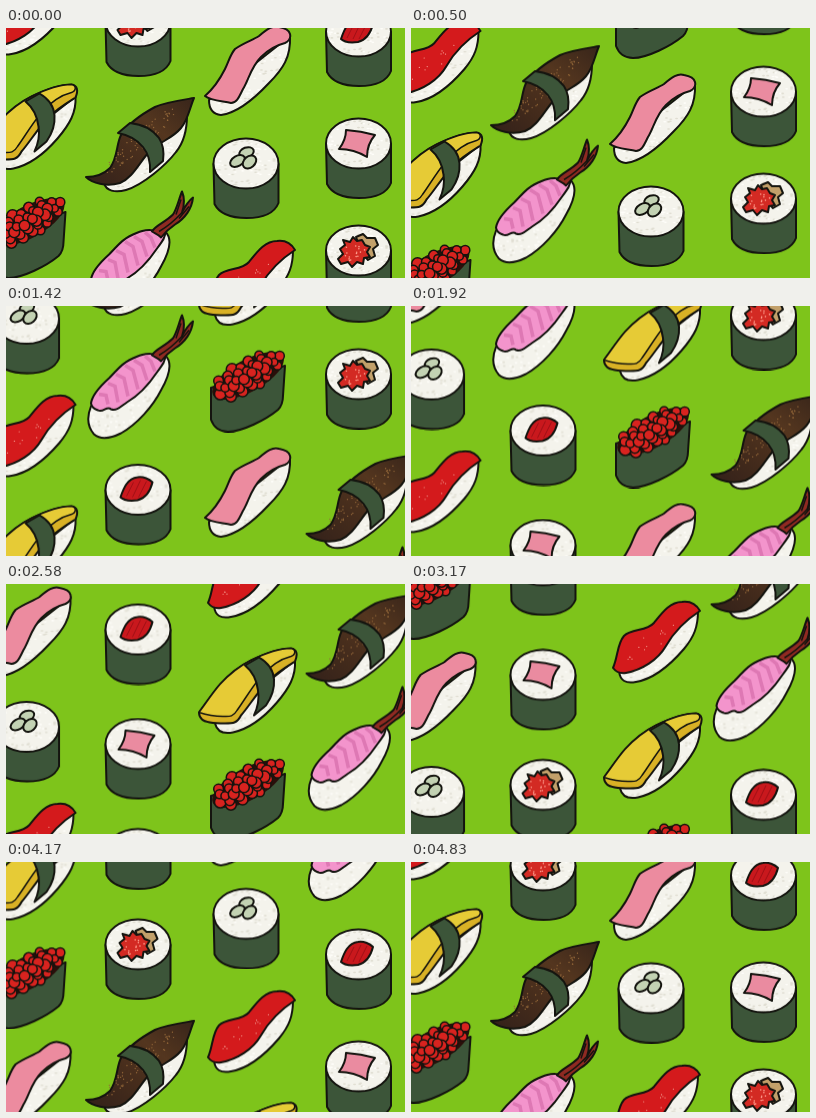
An HTML page for the animation above (4.91 s loop, 399x250 px).

```html
<!DOCTYPE html>
<html lang="en">
<head>
<meta charset="utf-8">
<title>Sushi columns</title>
<style>
  html, body { margin: 0; width: 100%; height: 100%; overflow: hidden; background: #7ec41b; }
  svg { display: block; width: 100%; height: 100%; }
  .up, .down { animation: up 4910ms -4ms infinite; }
  .down { animation-name: down; }
  /* 59 steps per loop, the first 11 a little slower */
  @keyframes up {
    0% { transform: translateY(0); animation-timing-function: steps(11); }
    18.644% { transform: translateY(-95px); animation-timing-function: steps(48); }
    100% { transform: translateY(-569px); }
  }
  @keyframes down {
    0% { transform: translateY(0); animation-timing-function: steps(11); }
    18.644% { transform: translateY(88px); animation-timing-function: steps(48); }
    100% { transform: translateY(534px); }
  }
  .ink { stroke: #14140f; stroke-width: 2; stroke-linejoin: round; stroke-linecap: round; }
  .thin { stroke: #14140f; stroke-width: 1.5; stroke-linejoin: round; }
  .line { fill: none; }
  .rice { fill: url(#grains); }
  .nori { fill: #3c5539; }
</style>
</head>
<body>
<svg viewBox="0 0 399 250" preserveAspectRatio="none">
  <defs>
    <pattern id="grains" width="40" height="40" patternUnits="userSpaceOnUse">
      <rect width="40" height="40" fill="#f4f3ec"/>
    </pattern>
    <linearGradient id="brown" x1="0" y1="1" x2="1" y2="0">
      <stop offset="0" stop-color="#33211a"/>
      <stop offset=".35" stop-color="#452c1c"/>
      <stop offset=".65" stop-color="#54361f"/>
      <stop offset="1" stop-color="#38251a"/>
    </linearGradient>

    <g id="roll">
      <path class="nori ink" d="M0 26 L1 66 C6 76 18 80 33 80 C49 80 61 75 65 65 L65 26Z"/>
      <ellipse class="rice ink" cx="32.5" cy="25.5" rx="32.5" ry="25"/>
    </g>
    <g id="tunaRoll">
      <use href="#roll"/>
      <path class="ink" fill="#c9181d" d="M15 33 C18 24 22 14 32 13 C38 12 44 15 47 18 C45 26 40 34 32 36 C24 37 18 36 15 33Z"/>
      <path class="line" stroke="#a01016" d="M21 32 L28 18 M27 33 L35 16 M33 33 L41 17"/>
    </g>
    <g id="pinkRoll">
      <use href="#roll"/>
      <path class="ink" fill="#ea8ba0" d="M20 12 Q35 13 49 17 Q41 26 41 39 Q28 31 13 31 Q20 22 20 12Z"/>
    </g>
    <g id="roeRoll">
      <use href="#roll"/>
      <path class="ink" fill="#c2a06a" d="M30 12 L37 9 L41 13 L49 13 L52 20 L47 24 L49 31 L42 35 L36 28Z"/>
      <path class="ink" fill="#d32a23" d="M12 34 L17 29 L14 24 L19 20 L17 15 L24 17 L27 12 L31 16 L36 15 L39 20 L44 22 L41 27 L44 32 L38 33 L37 39 L31 37 L26 42 L22 37 L15 39Z"/>
      <g id="roeDots" fill="#ff9c8c"></g>
    </g>
    <g id="cucumberRoll">
      <use href="#roll"/>
      <g class="ink" fill="#c3d2b3">
        <ellipse cx="33" cy="14.5" rx="7.5" ry="5" transform="rotate(-20 33 14.5)"/>
        <ellipse cx="24" cy="23" rx="8" ry="5" transform="rotate(-30 24 23)"/>
        <ellipse cx="36" cy="24" rx="7.5" ry="5.5" transform="rotate(-40 36 24)"/>
      </g>
    </g>

    <g id="salmon">
      <path class="rice ink" d="M6 73 C6 80 8 87 18 88 C34 86 52 71 66 56 C80 42 88 30 87 9Z"/>
      <path class="ink" fill="#ec8b9f" d="M2 69 C10 62 18 50 22 42 C26 34 27 28 32 22 C40 16 50 13 56 9 C64 2 70 -2 76 0 C82 1 86 3 87 7 C88 11 86 14 82 16 C74 18 66 22 58 30 C48 40 46 52 40 62 C36 70 34 76 28 76 C20 74 8 74 2 69Z"/>
    </g>
    <g id="tuna">
      <path class="rice ink" d="M7 70 C8 80 14 83 24 81 C42 78 60 62 72 48 C82 36 86 26 86 10Z"/>
      <path class="ink" fill="#d41a1c" d="M1 67 C6 56 5 43 12 35 C20 27 34 31 42 22 C50 12 58 1 70 1 C78 0 84 3 88 10 C74 19 62 31 54 45 C46 59 30 69 14 72 C8 73 4 71 1 67Z"/>
      <g id="tunaDots" fill="#f7a79a"></g>
    </g>
    <g id="omelette">
      <path class="rice ink" d="M16 77 C18 85 24 88 34 86 C52 82 66 70 78 56 C90 42 97 30 96 14Z"/>
      <path class="ink" fill="#d9b125" d="M0 66 C6 58 14 46 21 38 C30 28 40 20 52 14 C66 7 80 2 92 2 C98 3 99 8 96 15 C88 20 78 26 70 34 C58 46 50 60 42 69 C38 77 34 77 26 77 C16 77 6 76 3 73 C0 70 0 68 0 66Z"/>
      <path class="thin" fill="#e6cb36" d="M0 66 C6 58 14 46 21 38 C30 28 40 20 52 14 C66 7 80 2 92 2 C97 3 97 8 92 10 C80 13 70 21 62 30 C52 42 44 56 38 64 C34 71 30 70 24 70 C14 70 6 68 0 66Z"/>
      <path class="nori ink" d="M46 19 L60 11 Q74 19 75 33 Q76 46 67 59 L55 69 Q61 56 59 44 Q57 28 46 19Z"/>
    </g>
    <g id="gunkan">
      <path class="nori ink" d="M1 42 L1 74 C4 82 10 86 18 86 C32 86 56 74 68 64 C72 60 73 56 73 50 L75 20Z"/>
      <ellipse cx="38" cy="30" rx="40" ry="16" transform="rotate(-29 38 30)" fill="#2a0f0a"/>
      <g id="roe" class="thin"></g>
    </g>
    <g id="eel">
      <path class="rice ink" d="M18 86 C20 94 29 96 40 93 C57 88 80 68 90 55 C99 44 101 32 101 18Z"/>
      <path class="ink" fill="url(#brown)" d="M108 1 C96 3 80 5 69 10 C56 17 42 27 35 38 C30 48 32 60 24 71 C17 78 8 80 0 80 C6 86 20 90 34 86 C46 81 52 68 62 56 C74 44 86 42 95 31 C102 23 104 10 108 1Z"/>
      <g id="eelMarks" fill="#94683a"></g>
      <path class="nori ink" d="M32 36 L44 26 Q63 28 73 41 Q79 50 77 64 L64 75 Q65 60 57 50 Q48 39 32 36Z"/>
    </g>
    <g id="shrimp">
      <path class="rice ink" d="M4 92 C0 102 0 112 7 120 C14 126 24 124 34 119 C50 110 66 92 74 76 C82 62 86 48 78 41Z"/>
      <path class="ink" fill="#f394cc" d="M70 41 C60 37 50 42 42 46 C34 50 30 56 22 64 C12 73 5 82 4 89 C5 95 9 95 11 96 C16 99 20 91 24 95 C30 97 34 92 40 88 C52 81 62 70 70 58 C76 50 79 46 78 40Z"/>
      <path class="line" stroke="#de78b4" stroke-width="3.5" d="M12 80 L19 81 L21 90 M21 69 L28 72 L31 88 M29 60 L37 64 L41 82 M38 51 L46 56 L51 75 M47 46 L55 51 L60 66 M58 42 L64 47 L68 57"/>
      <path class="ink" fill="#8f2a22" d="M65 41 C68 35 78 32 86 24 C90 18 92 8 95 1 C98 8 97 16 95 22 C98 16 102 10 106 7 C105 18 98 28 88 34 C82 38 78 42 74 47 C72 44 68 43 65 41Z"/>
      <path class="line thin" d="M72 41 Q84 34 95 22 M94 9 L89 24 M102 16 L92 28"/>
    </g>
  </defs>
  <rect width="399" height="250" fill="#7ec41b"/>
  <g id="stage"></g>
</svg>
<script>
  const NS = 'http://www.w3.org/2000/svg';
  const byId = id => document.getElementById(id);

  function add(parent, tag, attrs) {
    const el = document.createElementNS(NS, tag);
    for (const key in attrs) el.setAttribute(key, attrs[key]);
    parent.append(el);
    return el;
  }

  let seed = 17;
  const rnd = () => (seed = seed * 16807 % 2147483647) / 2147483647;

  // Random flecks inside an ellipse turned by -42 degrees
  function flecks(id, n, cx, cy, rx, ry, size) {
    for (let i = 0; i < n; i++) {
      const a = rnd() * 6.283, r = Math.sqrt(rnd());
      const u = rx * r * Math.cos(a), v = ry * r * Math.sin(a);
      add(byId(id), 'circle', { cx: cx + u * .74 + v * .67, cy: cy - u * .67 + v * .74, r: size });
    }
  }

  const grains = byId('grains');
  for (let i = 0; i < 55; i++) {
    add(grains, 'ellipse', {
      cx: 2 + rnd() * 36, cy: 2 + rnd() * 36, rx: 1.5, ry: .8,
      fill: i % 2 ? '#e0ded2' : '#fffefa'
    });
  }
  flecks('tunaDots', 14, 42, 38, 42, 10, .6);
  flecks('roeDots', 16, 28, 27, 12, 9, .8);
  flecks('eelMarks', 75, 54, 44, 48, 8, .7);

  // Fish eggs spiral out over a tilted oval, outermost first
  const eggs = 36;
  for (let i = eggs - 1; i >= 0; i--) {
    const a = i * 2.4, r = Math.sqrt((i + .5) / eggs);
    const u = 38 * r * Math.cos(a), v = 15 * r * Math.sin(a);
    add(byId('roe'), 'circle', {
      cx: 38 + u * .87 + v * .48, cy: 29 - u * .48 + v * .87,
      r: 3.6 + rnd() * 2.2, fill: '#d8231f'
    });
  }

  const left = {
    tunaRoll: 99.5, pinkRoll: 99.5, roeRoll: 99.5, eel: 80, shrimp: 81,
    cucumberRoll: 207.5, salmon: 197, tuna: 201, omelette: 193, gunkan: 204
  };

  function column(dir, shift, loop, items) {
    const g = add(byId('stage'), 'g', { class: dir });
    for (const name in items) {
      for (const y of [items[name], items[name] + loop]) {
        add(g, 'use', { href: '#' + name, x: left[name] + shift, y });
      }
    }
  }

  column('down', -219.5, -534, { tuna: -55, omelette: 54.5, gunkan: 164, salmon: 264, cucumberRoll: 377.5 });
  column('up', 0, 569, { roeRoll: -32, eel: 69, shrimp: 162.5, tunaRoll: 312.5, pinkRoll: 427 });
  column('down', 0, -534, { salmon: -1, cucumberRoll: 110, tuna: 212, omelette: 322.5, gunkan: 430 });
  column('up', 220.5, 569, { tunaRoll: -22, pinkRoll: 90, roeRoll: 197, eel: 302, shrimp: 394.5 });
</script>
</body>
</html>
```
